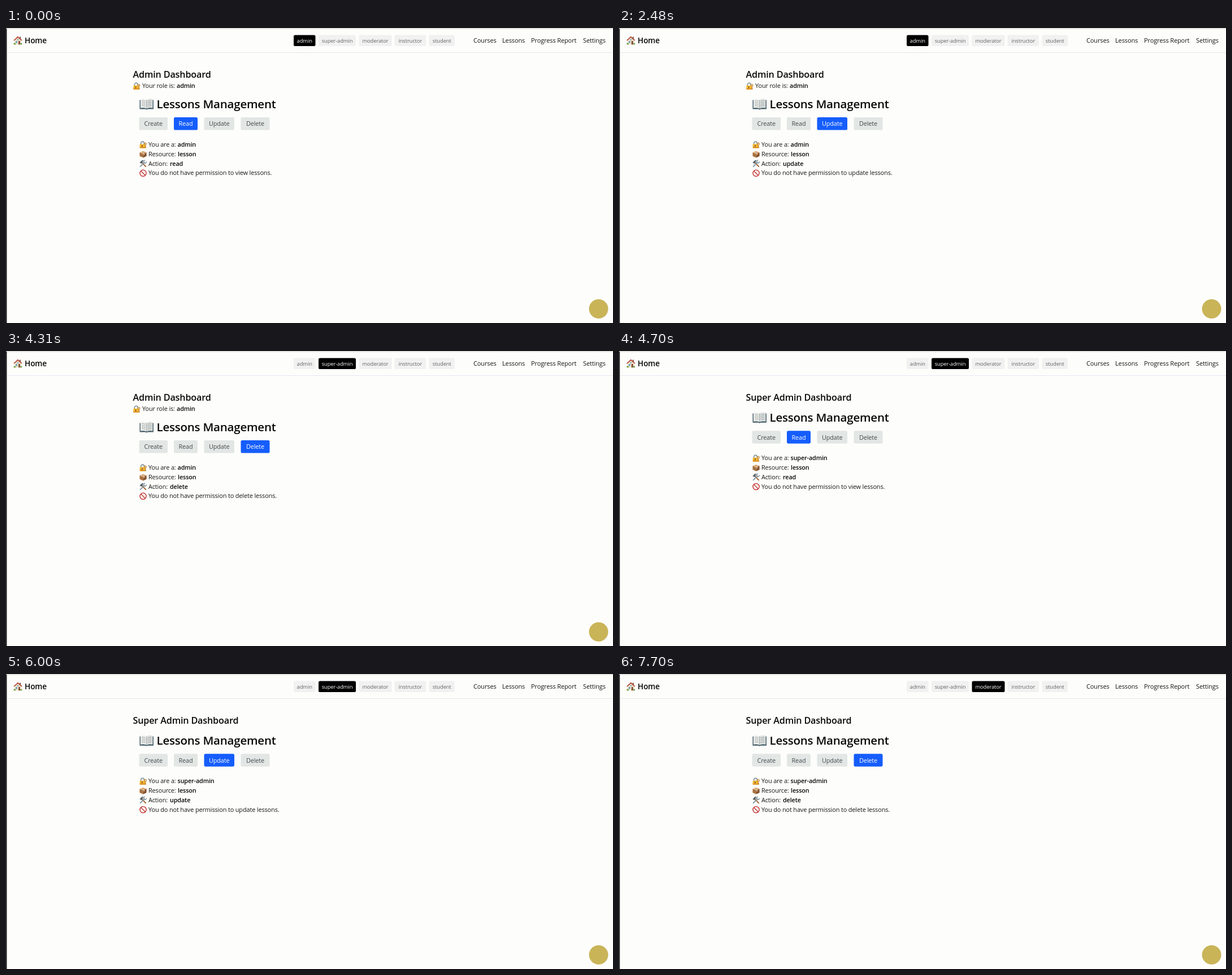
An HTML page that plays this animation: 1074 px wide and 522 px high, repeating every 8 s.

```html
<!DOCTYPE html>
<html lang="en">
<head>
<meta charset="utf-8">
<title>Lessons Management</title>
<style>
  html, body { margin: 0; width: 100%; height: 100%; overflow: hidden; background: #fdfdfb; }
  svg { display: block; }
  text { font: 10.9px "Open Sans", "Noto Sans", sans-serif; letter-spacing: -.011em; fill: #161616; }
  .bold { font-weight: 600; font-size: 10.8px; fill: #080808; }
  .brand { font-weight: 600; font-size: 13.7px; fill: #080808; }
  .title { font-weight: 600; font-size: 16.2px; fill: #080808; }
  .heading { font-weight: 600; font-size: 20.5px; fill: #080808; }
  .nav { font-size: 11px; }
  .pill text, .button text { text-anchor: middle; }
  .pill rect { fill: #f0f1f0; }
  .pill text { font-size: 9.4px; fill: #646464; }
  .pill.on rect { fill: #000; }
  .pill.on text { fill: #fff; }
  .button rect { fill: #e2e6e5; }
  .button text { fill: #454a4a; }
  .button.on rect { fill: #155dfc; }
  .button.on text { fill: #fff; }
</style>
</head>
<body>
<svg id="stage" width="1074" height="522" viewBox="0 0 1074 522">
  <defs>
    <symbol id="house" viewBox="0 0 16 16">
      <path d="M11 1.5h2.2v5H11z" fill="#8d5a4c"/>
      <path d="M2.5 7.5 8 2.5l5.5 5v7.7h-11z" fill="#f1e3c8"/>
      <path d="M8 .6.4 7.4l1 1.3L8 3l6.6 5.7 1-1.3z" fill="#b5493a"/>
      <path d="M4 9.3h3v3H4z" fill="#5b9fc4"/>
      <path d="M9 9h3v6.2H9z" fill="#855344"/>
      <path d="M6.7 5.7h2.6v2H6.7z" fill="#70a9c4"/>
      <path d="M.7 15.2q-.5-3 1.5-3 1.8 0 2.3 3zM12 15.2q.3-3 1.9-3t1.4 3z" fill="#6d9b3c"/>
    </symbol>
    <symbol id="lock" viewBox="0 0 16 16">
      <path d="M3.4 7.5V5a3.4 3.4 0 0 1 6.8 0v2.5" fill="none" stroke="#798b95" stroke-width="1.8"/>
      <rect x="1" y="6.8" width="11.4" height="8.4" rx="1.2" fill="#f6b72d"/>
      <path d="M1 12.8h11.4v1.3q0 1.1-1.2 1.1h-9q-1.2 0-1.2-1.1z" fill="#dc8f22"/>
      <circle cx="6" cy="10" r="1.2" fill="#57483a"/>
      <path d="M5.5 10h1v3h-1z" fill="#57483a"/>
      <circle cx="12.7" cy="6.5" r="2" fill="none" stroke="#c4842b" stroke-width="1.5"/>
      <path d="M12.7 8.5v6.7m0-1h2m-2-2.2h1.6" fill="none" stroke="#c4842b" stroke-width="1.4"/>
    </symbol>
    <symbol id="book" viewBox="0 0 26 22">
      <path d="M.5 3.5h25V20H15l-2 1-2-1H.5z" fill="#455d69"/>
      <path d="M2 2q7-2 11 1.5V19q-4-2.5-11-1z" fill="#f0f0ec"/>
      <path d="M24 2q-7-2-11 1.5V19q4-2.5 11-1z" fill="#dfe2df"/>
      <path d="M13 3.5V19" stroke="#9aa5a7"/>
      <path d="M4 5q4-.8 7 .8M4 8q4-.8 7 .8M4 11q4-.8 7 .8M4 14q4-.8 7 .8M22 5q-4-.8-7 .8M22 8q-4-.8-7 .8M22 11q-4-.8-7 .8M22 14q-4-.8-7 .8" fill="none" stroke="#8f9a9d" stroke-width=".9"/>
    </symbol>
    <symbol id="box" viewBox="0 0 16 16">
      <path d="m.8 4.3 7-2.7 7.4 2.7-7 3z" fill="#d5a576"/>
      <path d="m.8 4.3 7.4 3v8.2L.8 12.2z" fill="#a9713f"/>
      <path d="m15.2 4.3-7 3v8.2l7-3.3z" fill="#85532f"/>
      <path d="m3.6 3.2 7.4 2.9v3l-1.8.8V6.8L2 3.8z" fill="#e8cba5"/>
    </symbol>
    <symbol id="tools" viewBox="0 0 16 16">
      <path d="m4.7 5 8.8 9" stroke="#a3622d" stroke-width="2.3" stroke-linecap="round"/>
      <path d="M.7 5.9 5.6 1q2-.8 3.3.2L6.8 3l.6 1.5L4 7.8l-1.3-1z" fill="#4d5e68"/>
      <path d="m2.2 14 8.5-8.7" stroke="#8498a2" stroke-width="2.3" stroke-linecap="round"/>
      <path d="M14.9 3.6A3 3 0 1 1 12.3 1" fill="none" stroke="#8498a2" stroke-width="1.9"/>
    </symbol>
    <symbol id="ban" viewBox="0 0 16 16">
      <circle cx="8" cy="8" r="6.6" fill="#fff" stroke="#c43d38" stroke-width="1.8"/>
      <path d="m3.4 3.4 9.2 9.2" stroke="#c43d38" stroke-width="1.8"/>
    </symbol>
  </defs>

  <rect width="1074" height="522" fill="#fdfdfb"/>
  <rect width="1074" height="2" fill="#e5e5df"/>
  <rect y="1" width="1.4" height="521" fill="#151515"/>
  <rect x="2" y="43" width="1072" height="1" fill="#e6e6f3"/>
  <use href="#house" x="13" y="14" width="16" height="16"/>
  <text class="brand" x="33" y="27">Home</text>
  <g id="top"></g>
  <text class="title" id="title" x="224.5" y="88"></text>
  <g id="role">
    <use href="#lock" x="224.5" y="96" width="13.5" height="13.5"/>
    <text x="241" y="106.3">Your role is:</text>
    <text class="bold" x="302" y="106.3">admin</text>
  </g>
  <g id="panel">
    <use href="#book" x="236" y="124" width="25.5" height="21.5"/>
    <text class="heading" x="266.5" y="142">Lessons Management</text>
  </g>
  <circle id="badge" cx="1048.5" cy="497" r="17" fill="#c9b458"/>
</svg>
<script>
const LOOP = 8000;
const $ = id => document.getElementById(id);

// start time, active pill, page role, chosen action, badge shown
const steps = [
  [0, "admin", "admin", "Read", true],
  [2480, "admin", "admin", "Update", true],
  [3000, "admin", "admin", "Create", true],
  [3520, "admin", "admin", "Delete", true],
  [4310, "super-admin", "admin", "Delete", true],
  [4700, "super-admin", "super-admin", "Read", false],
  [4830, "super-admin", "super-admin", "Read", true],
  [5480, "super-admin", "super-admin", "Create", true],
  [6000, "super-admin", "super-admin", "Update", true],
  [6390, "super-admin", "super-admin", "Delete", true],
  [7570, "moderator", "super-admin", "Delete", true]
];

function add(parent, tag, attrs, label = "") {
  const el = document.createElementNS("http://www.w3.org/2000/svg", tag);
  for (const key in attrs) el.setAttribute(key, attrs[key]);
  el.textContent = label;
  parent.append(el);
  return el;
}

function chip(parent, kind, label, left, right, top, height, baseline) {
  const g = add(parent, "g", { class: kind });
  add(g, "rect", { x: left, y: top, width: right - left, height, rx: 2.6 });
  add(g, "text", { x: (left + right) / 2, y: baseline }, label);
  return [label, g];
}

const pills = [
  ["admin", 509, 547.5], ["super-admin", 553, 619], ["moderator", 624.5, 682.5],
  ["instructor", 687.5, 743], ["student", 748.5, 794]
].map(([label, l, r]) => chip($("top"), "pill", label, l, r, 12.5, 19.5, 25.6));

const buttons = [
  ["Create", 235.5, 286], ["Read", 297, 339], ["Update", 350.5, 404], ["Delete", 415.5, 466.5]
].map(([label, l, r]) => chip($("panel"), "button", label, l, r, 158, 22.5, 173.4));

[["Courses", 827], ["Lessons", 878], ["Progress Report", 929], ["Settings", 1021]]
  .forEach(([label, x]) => add($("top"), "text", { class: "nav", x, y: 26.4 }, label));

const rows = [
  ["lock", "You are a:", 303.5], ["box", "Resource:", 304], ["tools", "Action:", 290], ["ban", "", 0]
].map(([icon, label, valueX], i) => {
  const y = 210 + i * 16.8;
  add($("panel"), "use", { href: "#" + icon, x: 235.8, y: y - 10.3, width: 13.5, height: 13.5 });
  const text = add($("panel"), "text", { x: 252, y }, label);
  return valueX ? add($("panel"), "text", { class: "bold", x: valueX, y }) : text;
});

function show([, pill, role, action, badge]) {
  const isSuper = role === "super-admin";
  const verb = action.toLowerCase();
  pills.forEach(([label, g]) => g.classList.toggle("on", label === pill));
  buttons.forEach(([label, g]) => g.classList.toggle("on", label === action));
  $("title").textContent = (isSuper ? "Super " : "") + "Admin Dashboard";
  $("role").style.display = isSuper ? "none" : "";
  $("panel").setAttribute("transform", `translate(0 ${isSuper ? -16.8 : 0})`);
  $("badge").style.display = badge ? "" : "none";
  [role, "lesson", verb, `You do not have permission to ${verb === "read" ? "view" : verb} lessons.`]
    .forEach((value, i) => { rows[i].textContent = value; });
}

let current;
const start = performance.now();
function tick() {
  const t = (performance.now() - start) % LOOP;
  const step = steps.findLast(s => s[0] <= t);
  if (step !== current) show(current = step);
  requestAnimationFrame(tick);
}
tick();
</script>
</body>
</html>
```
